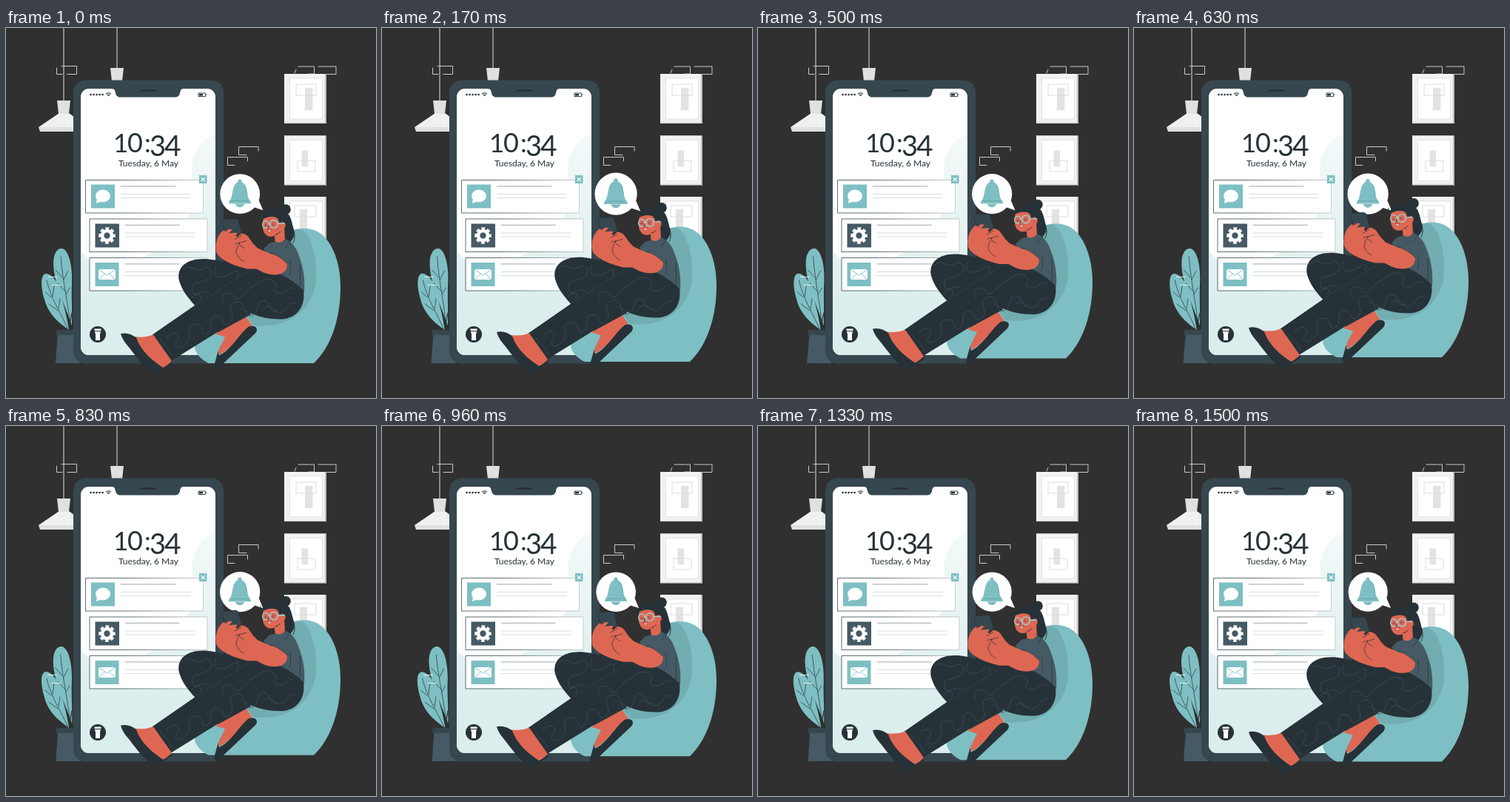
Animation, 500 px wide and 500 px high, one loop 1540 ms. Source, as an HTML page:

```html
<!DOCTYPE html>
<html lang="en">
<head>
<meta charset="utf-8">
<title>Notifications</title>
<style>
  html, body { margin: 0; width: 100%; height: 100%; overflow: hidden; background: #303030; }
  svg { display: block; width: 100vw; height: 100vh; }
  text { font-family: Lato, Inter, sans-serif; fill: #263238; }
  .line { fill: none; stroke-linecap: round; stroke-linejoin: round; }
  .teal { fill: #7ebfc3; }
  .slate { fill: #455a64; }
  .steel { fill: #37474f; }
  .dark { fill: #263238; }
  .skin { fill: #de6753; }
</style>
</head>
<body>
<svg viewBox="0 0 500 500">
  <defs>
    <linearGradient id="edge">
      <stop offset=".3" stop-color="#37474f"/>
      <stop offset="1" stop-color="#37474f" stop-opacity=".3"/>
    </linearGradient>
    <linearGradient id="wash" x2="0" y2="1">
      <stop stop-color="#f3f9f9"/>
      <stop offset=".8" stop-color="#dbeded"/>
    </linearGradient>
    <g id="frame">
      <path fill="#e0e0e0" d="M376 0h57v67h-57z"/>
      <path fill="#f2f2f2" d="M376 0h55v65h-55z"/>
      <path fill="#fff" stroke="#d8d8d8" stroke-width=".7" d="M383.500 6h44v55h-44z"/>
      <path stroke="#bdbdbd" stroke-width="1.800" d="M432 0v67"/>
    </g>
    <g id="card">
      <path fill="#fff" stroke="url(#edge)" stroke-width=".8" d="M0 0h159v44.500H0z"/>
      <path class="line" stroke="#b4b8bd" stroke-width="1.300" d="M48 8.300h73"/>
      <path class="line" stroke="#dadddf" d="M48 19h94M48 24h94"/>
    </g>
  </defs>

  <!-- lamps -->
  <path stroke="#c4c4c4" stroke-width="1.200" d="M78 0V99M150 0V55"/>
  <path fill="#f0f0f0" d="M72 115h13l26 19H44z"/>
  <path fill="#e0e0e0" d="M69 98h18l-2 18H71zM141 54h18l-2 18h-14zM44 134h68v6H46z"/>

  <!-- wall outlines -->
  <path class="line" stroke="#c9c9c9" stroke-width="1" d="M75 51.500H95.500V62.500H83M76 62.500H68.500V54M395 52H416.500V62H409M390 61l2-5M422 52H446V62.500H432M325 171.500H314.500V160.500H341V166M309 185.500H299.500V174.500H326.500V180"/>

  <!-- pictures -->
  <use href="#frame" y="62"/>
  <use href="#frame" y="145.500"/>
  <use href="#frame" y="228"/>
  <path fill="#e3e3e3" d="M404 81h10.500v30H404zM399.500 165.500h8.500v22h-8.500zM397 245h10v27h-10z"/>
  <path fill="none" stroke="#dcdcdc" d="M392 76h27v15h-27zM394 179h24v15h-24zM390 240h29v15h-29z"/>

  <g id="plant">
    <path class="teal" d="M89 402C83 382 64 346 64 318 64 305 69 297 76 298 86 301 90 325 89 345 88 365 90 385 89 402zM85 408C77 402 58 390 52 367 47 350 46 333 54 332 65 333 71 347 74 361 79 377 83 394 85 408z"/>
    <path class="line" stroke="#263238" stroke-width=".7" d="M74 309C76 342 85 373 87 408M55 341C60 365 75 386 84 408M67 327l9 10M70 345l10 11M84 328l-6 12M86 351l-5 9M53 357l8 7M58 373l12 9M65 348l-2 15M73 366l-2 13"/>
    <path class="line" stroke="#263238" stroke-width="1.300" d="M89 385q-3 12-3 25"/>
    <path class="slate" d="M70 413h27l3 40H67z"/>
    <path class="steel" d="M68 408h32v7H68z"/>
    <path class="line" stroke="#eef5f5" stroke-width=".9" d="M57 336.500h12M62 347.500h12"/>
  </g>

  <!-- phone -->
  <rect class="steel" x="91" y="70.500" width="203" height="383" rx="16"/>
  <path fill="#fff" d="M112 82h30c5 0 5 2 6 6s3 5.500 7 5.500h73c4 0 6-1.500 7-5.500s1-6 6-6h31a11 11 0 0 1 11 11v338a11 11 0 0 1-11 11H112a11 11 0 0 1-11-11V93a11 11 0 0 1 11-11z"/>
  <path fill="url(#wash)" d="M283 144C255 153 246 185 254 212 263 248 225 290 180 313 150 329 112 321 101 301V431a11 11 0 0 0 11 11H272a11 11 0 0 0 11-11z"/>
  <path class="line" stroke="#263238" stroke-width="2.600" d="M183 84.500h19"/>
  <path class="line" stroke="#263238" stroke-width="2.700" d="M114.500 90h.01m4 0h.01m4 0h.01m4 0h.01m4 0h.01"/>
  <path class="line" stroke="#263238" stroke-width="1.100" d="M135.500 89q3-2.400 6 0M137 90.700q1.500-1.200 3 0M138.500 91.700v.1"/>
  <path fill="none" stroke="#263238" stroke-width=".9" d="M260 88h9.500v4.500H260zM271 89.500v1.500"/>
  <path class="dark" d="M261 89h5v2.500h-5z"/>

  <text y="168" font-size="35"><tspan x="145">1</tspan><tspan x="164" font-size="36">0</tspan><tspan x="187">:</tspan><tspan x="194" y="173" font-size="38">3</tspan><tspan x="214" y="173" font-size="39">4</tspan></text>
  <text x="192.500" y="187" font-size="12" text-anchor="middle">Tuesday, 6 May</text>

  <!-- notifications -->
  <use href="#card" x="107.500" y="205.500"/>
  <use href="#card" x="113" y="258"/>
  <use href="#card" x="113" y="310.500"/>
  <path class="teal" d="M115 211.500h32v32h-32zM120.500 317h32v32h-32zM261 199h10.500v11H261z"/>
  <path class="slate" d="M120.500 264.500h32.500v32h-32.500z"/>
  <path class="line" stroke="#fff" stroke-width="1.200" d="M264 202.300l4.600 4.600m0-4.600l-4.600 4.600"/>
  <ellipse fill="#fff" cx="131" cy="227" rx="10" ry="8.500"/>
  <path fill="#fff" d="M123 230l-1 7 8-3z"/>
  <g fill="none" stroke="#fff" transform="translate(136.500 280.500)">
    <circle r="6.500" stroke-width="4.600"/>
    <circle r="9.500" stroke-width="3.600" stroke-dasharray="4.480 2.980" stroke-dashoffset="2.240"/>
  </g>
  <path fill="#fff" d="M125 326h23v14h-23z"/>
  <path class="line" stroke="#7ebfc3" stroke-width=".9" d="M125 326l11.500 8 11.500-8M125 340l8.500-8M148 340l-8.500-8"/>

  <circle class="dark" cx="124" cy="414" r="11"/>
  <path fill="#fff" d="M119.500 406.500h9v2.500h-9zM120 410h8l-1 4v8h-6v-8z"/>

  <g id="bubble">
    <path fill="#fff" d="M335 242l12 4-6-14z"/>
    <circle fill="#fff" cx="316.200" cy="224.200" r="26.600"/>
    <path class="teal" d="M313.500 208.500a2.700 2.700 0 1 1 5 0C326 211 325 224 328 231q3 3 3 6H301q0-3 3-6C307 224 306 211 313.500 208.500zM310.500 238h11q-1 4-5.500 4t-5.500-4z"/>
    <path class="line" stroke="#5d9ca0" stroke-width=".7" d="M304 233.500h24M323 213q2 5 2.500 12M310 238h12"/>
  </g>

  <g id="reader">
    <!-- bean bag -->
    <path class="teal" d="M370 285C382 272 403 267 420 275 440 285 452 317 452 349 452.500 391 440 431 416 453.500H274C260 447 251 434 257 424 270 405 330 390 360 380z"/>
    <path fill="#72adb1" d="M382 276Q391 271 400 273C416 284 422 323 418 349 411 382 382 408 334 402L322 385z"/>

    <!-- far leg and its shoe -->
    <path class="skin" d="M283 414L322 387 333 403C318 413 304 435 286 443 288 432 293 424 296 418z"/>
    <path class="dark" d="M328 404C337 401 342 407 337 413L285 462 281 458C284 446 287 436 289 430 287 435 286 439 288 443 304 436 315 414 328 404z"/>
    <path class="dark" d="M234 342C229 319 252 308 282 314 309 321 337 323 360 333L330 388 286 412 254 374C247 366 238 356 234 342z"/>

    <!-- far arm -->
    <path class="skin" d="M297 272C287 277 282 289 284 303 289 314 306 321 326 326L342 326 314 290 312 282z"/>
    <path class="steel" stroke="#263238" stroke-width=".8" d="M292 264q-1-4 3-5l15-1q3 0 4 3l4 14q0 4-3 4l-14 1q-3 0-4-3z"/>
    <path class="skin" d="M294 277l8-5 4 1-5 5 10-1q3 2-1 4l-14 7z"/>

    <!-- hair behind, neck -->
    <circle class="dark" cx="378" cy="245.500" r="6.800"/>
    <path class="dark" d="M346 257C350 246 362 242 373 246 385 250 386 262 389 273 392 283 385 291 377 293L364 272z"/>
    <path class="line" stroke="#263238" stroke-width="1" d="M387 270q6 12 1 21M346 255q-3 2-2-3"/>
    <path class="skin" d="M362 274L376 268 377 287Q371 295 364 293z"/>

    <!-- shirt -->
    <path class="slate" d="M364 289Q372 293 377 285 390 291 395 306C403 326 404 341 403 357L352 328 352 306 348 299 355 292z"/>
    <path class="line" stroke="#263238" stroke-width=".7" d="M382 309q5 16 1 26M385 289q-9 7-11 16M397 320q1 20 0 30"/>

    <!-- face -->
    <path class="skin" d="M348 257C345 268 347 280 355 282 363 284 371 277 372 272 378 273 380 265 375 263Q368 261 367 255 358 252 348 257z"/>
    <path class="dark" d="M345 260Q352 248 366 248L373 263 369 264Q369 258 364 256 354 254 345 260z"/>
    <g fill="none" stroke="#9bd3d4" stroke-width="1.400">
      <ellipse cx="351" cy="266" rx="4.300" ry="4.800"/>
      <circle cx="362" cy="265.500" r="5.300"/>
      <path d="M367 264.500l10 0M355 265l2-.5"/>
    </g>
    <path class="line" stroke="#263238" stroke-width="1" d="M351 266v1.500M361 265v1.500M355 267l-1 4M364 280q4-1 6-4"/>
    <path fill="#fff" stroke="#9c2f2b" stroke-width=".7" d="M353 273q3 1.500 6-.5-1 4-4 3.500z"/>

    <!-- near leg -->
    <path class="dark" d="M197 415.500L257 374 322 333C345 320 376 329 402 355 405 376 394 393 372 394 354 394 342 391 329 385L285 412 222 451z"/>
    <path class="line" stroke="#3f4e57" stroke-width=".8" d="M238 328c10-12 18 5 28-2s18 7 6 14-22 2-20 15 14-3 22 3M284 323c-8 13 6 18 18 10s14-4 10 4M252 365c5-8 15-4 10 3M218 419c8-13 20-4 13 5s6 12 14 1-6-21 9-24 8 19 18 12 0-23 12-23 6 17 18 9-8-23 8-28 10 22 22 18 6-22 17-20 4 17 17 13M294 372c-8-14 10-18 15-8s16-11 24-14 17-16 28-8-6 12 6 16 16-13 22-5M348 380c10-10 16 9 25 4s8-14 18-12M208 421c4 8 10 8 17 23"/>
    <path class="line" stroke="#39484f" stroke-width=".7" d="M257 374L330 328M329 385q-9-5-13-6"/>

    <!-- near foot -->
    <path class="skin" d="M170 417Q186 420 199 415L223 449 224 453 211 460C194 450 180 436 170 417z"/>
    <path class="dark" d="M155 413.500Q166 411 176 419C182 436 196 449 213 460L224 451 225 454 201 470C188 461 176 445 167 433 161 426 157 421 155 413.500z"/>

    <!-- near arm -->
    <path class="skin" d="M309 286L318 278Q326 279 329 285 333 292 340 298L358 306Q376 307 380 319C381 334 364 337 348 331L319 316C309 310 308 303 313 295L317 290 310 292z"/>
    <path class="line" stroke="#263238" stroke-width=".7" d="M309 286l9-5M310 292l7-2q-5 5-6 12 1 9 10 14M318 290l7-2M316 294l6 4"/>
    <path class="slate" d="M357 291Q369 290 381 300L387 311 380 319Q371 309 357 304z"/>
    <path class="line" stroke="#263238" stroke-width=".6" d="M357 304q14 5 23 15"/>
  </g>
</svg>
<script>
  const PERIOD = 1540, LEAD = 30;
  const part = id => document.getElementById(id);
  const plant = part('plant'), bubble = part('bubble'), reader = part('reader');

  // Linear interpolation through [position, value] stops.
  function track(stops, p) {
    const i = stops.findIndex(([pos]) => pos >= p);
    if (i < 1) return stops[0][1];
    const [a, from] = stops[i - 1], [b, to] = stops[i];
    return from + (to - from) * (p - a) / (b - a);
  }

  const FLOAT = [[0, 0], [.5, -10], [1, 0]];
  const WIND = [[0, 0], [.25, 1], [.75, -1], [1, 0]];
  const BEAT = [[0, 1], [.14, 1.08], [.28, 1], [.42, 1.04], [.7, 1], [1, 1]];

  const start = performance.now();
  function draw() {
    const p = (performance.now() - start + LEAD) % PERIOD / PERIOD;
    reader.setAttribute('transform', `translate(0 ${track(FLOAT, p)})`);
    plant.setAttribute('transform', `rotate(${track(WIND, p)} 75 375)`);
    bubble.setAttribute('transform', `translate(317 224.3) scale(${track(BEAT, p)}) translate(-317 -224.3)`);
    requestAnimationFrame(draw);
  }
  draw();
</script>
</body>
</html>
```
